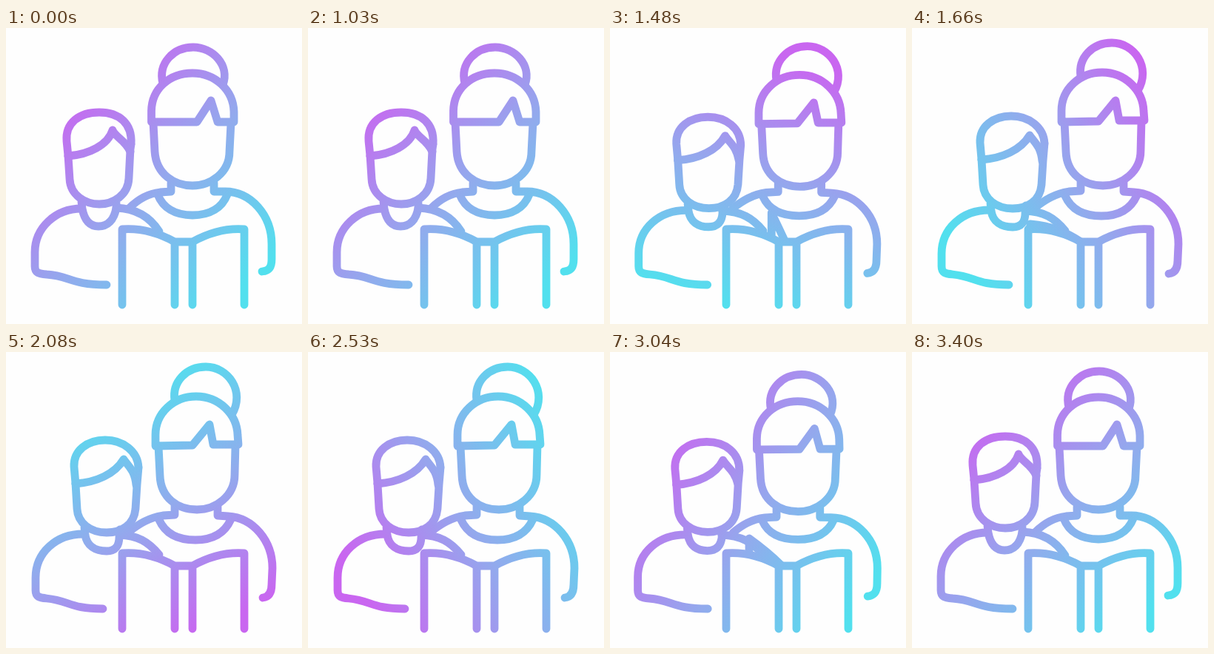
An HTML page for the animation above (3430 ms loop, 400 by 400 pixels).

```html
<!DOCTYPE html>
<html lang="en">
<head>
<meta charset="utf-8">
<title>Reading together</title>
<style>
  html, body { margin: 0; width: 100%; height: 100%; overflow: hidden; background: #fefefe; }
  svg { display: block; width: 100vw; height: 100vh; }
</style>
</head>
<body>
<svg viewBox="0 0 400 400">
  <defs>
    <linearGradient id="ramp" gradientUnits="userSpaceOnUse">
      <stop offset="0" stop-color="#c966f0"/>
      <stop offset=".5" stop-color="#92aaed"/>
      <stop offset="1" stop-color="#52e0ee"/>
    </linearGradient>
    <clipPath id="aboveBook">
      <path d="M150 150V272H157C184 270 208 278 228 289H252C272 278 296 270 322 272H330V150Z"/>
    </clipPath>
  </defs>
  <g id="art" fill="none" stroke="url(#ramp)" stroke-width="10.8" stroke-linecap="round" stroke-linejoin="round">
    <g clip-path="url(#aboveBook)"><path id="page"/></g>
    <path d="M157 374V272C184 270 208 278 228 289H252C272 278 296 270 322 272V374M228 289V374M252 289V374"/>
  </g>
</svg>
<script>
const LOOP = 3430, START = 1030, END = 3400;
const $ = id => document.getElementById(id);
const clamp = v => Math.min(1, Math.max(0, v));
const span = (t, a, b) => clamp((t - a) / (b - a));
const ease = p => (1 - Math.cos(Math.PI * p)) / 2;
const bump = p => Math.sin(Math.PI * p) ** 2;

// Each person bends from one pose to the other, dipping on the way.
const mother = { go: [1060, 1650], back: [2680, 3280], floor: 250, height: 225, dip: 6.5 };
const boy = { go: [1080, 1665], back: [2750, 3400], floor: 268, height: 154, dip: 4.5 };

// who, upright pose, leaning pose, whether it belongs to the body
const shapes = [
  // bun
  [mother, "M212 75C205 47 227 26 253 26C279 26 303 50 293 77",
           "M228 66C224 40 244 20 270 20C300 20 324 53 305 85"],
  // hair
  [mother, "M196.5 127L196.5 112C197 82 221 61 252 61C283 61 307 84 308 113L308 127L286 127L277 98L258 127Z",
           "M202 127L202 112C202 82 227 60 257 60C288 60 312 84 313 112L314 125L280 125L275 98L252 126Z"],
  // face
  [mother, "M199 128L201 167C203 198 228 213 252 213C276 213 302 196 302 167L304 128",
           "M206 127L208 167C209 197 232 213 258 213C284 213 309 194 309 166L310 126"],
  // shoulders and collar
  [mother, "M223 209L223 221L208 222C190 224 178 232 167 243",
           "M228 207L228 220L212 221C193 224 180 232 166 243", true],
  [mother, "M281 209L281 221L296 221C331 221 359 253 359 292L359 312C359 323 356 328 346 329",
           "M286 206L286 221L300 222C334 224 360 255 360 292L359 314C359 324 356 331 347 332", true],
  [mother, "M205 225C212 243 228 253 252 253C276 253 292 243 299 225",
           "M207 227C215 245 232 254 256 254C280 254 296 244 304 226", true],
  // hair and fringe
  [boy, "M84 173L82 153C80 128 99 114 126 114C153 114 171 129 169 157",
        "M94 178L92 155C91 133 110 119 134 119C158 119 178 134 179 156"],
  [boy, "M84 173C112 171 138 158 144 138C147 147 161 151 168 167",
        "M94 178C122 176 147 165 159 145C166 155 174 160 176 180"],
  // face
  [boy, "M84 173L86 204C87 226 107 238 126 238C145 238 165 226 166 203L168 164L169 157",
        "M94 178L96 212C97 231 114 244 136 244C157 244 173 233 175 212L177 180L179 156"],
  // neck, shoulders and hem
  [boy, "M102 235L103 244C106 260 113 268 125 268C137 268 146 260 149 243L149 236",
        "M106 237L107 247C109 262 121 269 136 269C148 269 153 262 153 250L154 240"],
  [boy, "M102 244C67 244 39 270 39 303L39 322C39 331 44 332 55 333C87 335 86 347 136 347",
        "M104 246C68 246 40 271 40 305L40 322C40 331 45 332 55 333C86 336 86 347 131 347", true],
  [boy, "M149 243C176 244 195 256 207 275",
        "M153 247C178 248 192 256 207 274", true]
];

const numbers = s => s.match(/[\d.]+/g).map(Number);
const parts = shapes.map(([who, up, lean, body]) => {
  const el = document.createElementNS("http://www.w3.org/2000/svg", "path");
  $("art").insertBefore(el, $("art").firstChild);
  return { el, who, body, cmd: up, a: numbers(up), b: numbers(lean) };
});

function drawPart({ el, who, body, cmd, a, b }, t) {
  const k = ease(span(t, ...who.go)) - ease(span(t, ...who.back));
  const dip = bump(span(t, START, 1640)) + bump(span(t, 2680, END));
  const pts = a.map((v, i) => v + (b[i] - v) * k);
  for (let i = 0; i < pts.length; i += 2) {
    if (body) pts[i] += dip * 2 * (pts[i] - 200) / 160;
    const rise = Math.max(0, (who.floor - pts[i + 1]) / who.height);
    pts[i + 1] += dip * who.dip * Math.sqrt(rise);
  }
  let n = 0;
  el.setAttribute("d", cmd.replace(/[\d.]+/g, () => pts[n++].toFixed(2)));
}

// The turning page straightens as it rises from the spread.
function drawPage(t) {
  const p = t < 2400 ? span(t, 1170, 1700) : span(t, 2660, 3190);
  if (p === 0 || p === 1) return $("page").setAttribute("d", "");
  const cos = Math.cos(Math.PI * p), sin = Math.sin(Math.PI * p);
  const x = 240 + 12 * cos, dx = 70.5 * cos, dy = -17 - (10 + 22 * p) * sin;
  const at = (f, curl) => `${x + f * dx} ${289 + f * dy - curl * (1 - sin)}`;
  $("page").setAttribute("d", `M${at(0, 0)}C${at(.29, 8)} ${at(.57, 10)} ${at(1, 0)}V374`);
}

function drawRamp(t) {
  const turn = ease(span(t, START, END) ** .78);
  const angle = (46 + 360 * turn) * Math.PI / 180;
  const dx = 174 * Math.cos(angle), dy = 174 * Math.sin(angle);
  const ends = { x1: 212 - dx, y1: 212 - dy, x2: 212 + dx, y2: 212 + dy };
  for (const key in ends) $("ramp").setAttribute(key, ends[key]);
}

function draw(now) {
  const t = Math.floor((now % LOOP - 10) / 30) * 30 + 10;
  parts.forEach(part => drawPart(part, t));
  drawPage(t);
  drawRamp(t);
}

let begin;
function tick(now) {
  begin ??= now;
  draw(now - begin);
  requestAnimationFrame(tick);
}
draw(0);
requestAnimationFrame(tick);
</script>
</body>
</html>
```
